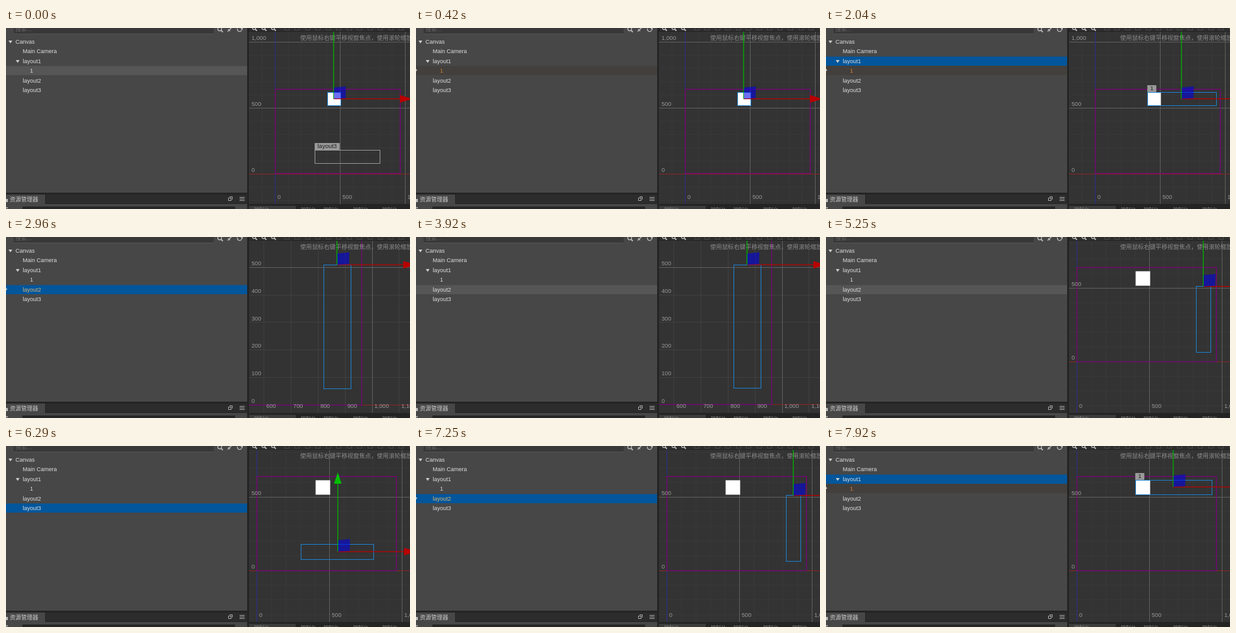
Animation, 640 px wide and 288 px high, one loop 8 s. Source, as an HTML page with a canvas:

```html
<!DOCTYPE html>
<html lang="zh">
<head>
<meta charset="utf-8">
<style>
html, body { margin: 0; width: 100%; height: 100%; overflow: hidden; background: #262626; }
canvas { display: block; }
</style>
</head>
<body>
<canvas id="stage" width="640" height="288"></canvas>
<script>
const c = document.getElementById('stage').getContext('2d');
const LOOP = 8000;
const SANS = '"Liberation Sans", "Noto Sans CJK SC", "Noto Sans CJK", sans-serif';

// Nodes in world units: left, bottom, right, top, pivot
const nodes = {
  layout1: { box: [400, 515, 927, 615], pivot: [663, 568] },
  1: { box: [400, 515, 500, 615], pivot: [449, 568] },
  layout2: { box: [820, 60, 920, 510], pivot: [870, 510] },
  layout3: { box: [304, 77, 806, 178], pivot: [557, 128] }
};
const rows = [
  ['Canvas', 15, 22, true], ['Main Camera', 26.5, 37.5], ['layout1', 26.5, 53, true],
  ['1', 38, 68], ['layout2', 26.5, 84], ['layout3', 26.5, 99]
];

// time, selected node, tree focused, hovered node, pointer in tree
const states = [
  [0, '1', false, 'layout3', false],
  [120, '1', false, null, false],
  [240, '1', false, '1', true],
  [960, '1', false, 'layout1', true],
  [1140, 'layout1', true, 'layout1', true],
  [1340, 'layout1', true, '1', true],
  [2080, 'layout1', true, 'layout2', true],
  [2710, 'layout2', true, 'layout2', true],
  [3580, 'layout2', true, null, false],
  [3920, 'layout2', false, null, false],
  [5290, 'layout2', false, 'layout3', true],
  [5650, 'layout3', true, 'layout3', true],
  [5920, 'layout3', true, null, false],
  [6330, 'layout3', true, 'layout2', true],
  [6620, 'layout2', true, 'layout2', true],
  [7290, 'layout2', true, 'layout1', true],
  [7620, 'layout1', true, 'layout1', true],
  [7870, 'layout1', true, '1', true]
];

// time, origin x, origin y, scale x, scale y
const views = [
  [0, 426.5, 232, .206, .21],
  [2830, 426.5, 232, .206, .21],
  [2831, 152, 267, .428, .437],
  [3920, 152, 267, .428, .437],
  [4290, 300, 216, .282, .286],
  [4330, 300, 216, .282, .286],
  [4500, 355, 216, .282, .286],
  [4710, 355, 216, .282, .286],
  [4790, 397.5, 198, .23, .234],
  [LOOP, 397.5, 198, .23, .234]
];

function viewAt(t) {
  const i = views.findIndex(v => v[0] > t), a = views[i - 1], b = views[i];
  const k = (t - a[0]) / (b[0] - a[0]);
  return a.slice(1).map((n, j) => n + (b[j + 1] - n) * k);
}
function fill(color, x, y, w, h) {
  c.fillStyle = color;
  c.fillRect(x, y, w, h);
}
function line(color, width, ...pts) {
  c.strokeStyle = color;
  c.lineWidth = width;
  c.beginPath();
  for (let i = 0; i < pts.length; i += 2) c.lineTo(pts[i], pts[i + 1]);
  c.stroke();
}
function poly(color, ...pts) {
  c.fillStyle = color;
  c.beginPath();
  for (let i = 0; i < pts.length; i += 2) c.lineTo(pts[i], pts[i + 1]);
  c.fill();
}
function text(s, x, y, color, size = 9) {
  c.font = `${size}px ${SANS}`;
  c.textBaseline = 'alphabetic';
  c.fillStyle = color;
  c.fillText(s, x, Math.floor(y + size * .36));
}
function lens(x, y, r) {
  c.strokeStyle = '#bbb';
  c.lineWidth = 1.3;
  c.beginPath();
  c.arc(x, y, r, 0, 7);
  c.stroke();
  line('#bbb', 1.8, x + r * .7, y + r * .7, x + r + 2, y + r + 2);
}
const snap = n => Math.floor(n) + .5;

function drawTree(sel, focus, hover, inTree) {
  fill('#474747', 0, 0, 382, 263);
  fill('#383838', 12, 0, 317, 9);
  text('搜索...', 15, 2, '#666');
  line('#555', 1, 12, 9.5, 329, 9.5);
  lens(338.5, 1.5, 3);
  line('#bbb', 1.5, 351, 5.5, 357, 0);
  line('#bbb', 1.2, 352, 2, 355, 5);
  c.strokeStyle = '#bbb';
  c.lineWidth = 1.3;
  c.beginPath();
  c.arc(370, 2, 3.5, -.3, 3.5);
  c.stroke();
  poly('#bbb', 371, 0, 375, 0, 375, 3);

  for (const [name, x, y, open] of rows) {
    const over = inTree && hover === name, on = sel === name;
    const back = on && focus ? '#03569c' : over ? '#423f3c' : on ? '#565656' : null;
    if (back) fill(back, 0, y - 7.5, 382, 14.5);
    if (open) poly('#ccc', x - 11, y - 2, x - 5, y - 2, x - 8, y + 2.5);
    if (over) poly('#ccc', 0, y - 3, 2, y - 1, 0, y + 1);
    text(name, x, y, over ? (on && focus ? '#d9b36c' : '#e0802c') : '#ddd');
  }
}

function drawAssets() {
  fill('#242424', 0, 262, 384, 26);
  fill('#474747', 0, 265, 62, 16);
  fill('#2c2c2c', 63, 265, 319, 14);
  fill('#474747', 0, 280, 382, 8);
  fill('#262626', 26, 284, 337, 4);
  fill('#bbb', 0, 272, 3, 5);
  text('资源管理器', 6, 273, '#ccc');
  c.strokeStyle = '#aaa';
  c.lineWidth = 1;
  c.strokeRect(352.5, 270.5, 4, 4);
  line('#aaa', 1, 354, 268.5, 358.5, 268.5, 358.5, 273);
  for (const y of [269.5, 272, 274.5]) line('#aaa', 1, 370, y, 378, y);
  poly('#bbb', 0, 285, 3, 285, 1.5, 288);
}

function drawGizmo(x, y) {
  line('#c00000', 1.3, x, y, x + 107, y);
  line('#00b400', 1.3, x, y, x, y - 108);
  poly('#b80000', x + 105, y - 6, x + 125, y, x + 105, y + 6);
  poly('#00c000', x - 6, y - 108, x, y - 126, x + 6, y - 108);
  poly('rgba(0,0,230,.57)', x + .5, y - 18, x + 19.5, y - 20, x + 19, y - 1, x + .5, y);
}

function drawScene(view, sel, hover) {
  const [ox, oy, sx, sy] = view;
  const X = n => ox + n * sx, Y = n => oy - n * sy;
  const rect = ([l, b, r, t]) => [Math.round(X(l)) + .5, snap(Y(t)), Math.round((r - l) * sx), Math.round((t - b) * sy)];
  c.save();
  c.beginPath();
  c.rect(385, 6, 255, 274);
  c.clip();
  fill('#333', 385, 6, 255, 274);

  const grid = major => {
    const color = major ? '#606060' : sx > .4 ? '#404040' : '#383838';
    for (let n = -1000; n <= 2000; n += 100) {
      if ((n % 500 === 0) !== major) continue;
      const x = snap(X(n)), y = snap(Y(n));
      line(color, 1, x, 6, x, 280);
      line(color, 1, 385, y, 640, y);
    }
  };
  grid(false);
  grid(true);
  line('#902424', 1, 385, snap(oy), 640, snap(oy));
  line('#2c2c90', 1, snap(ox), 6, snap(ox), 280);
  c.strokeStyle = '#800080';
  c.lineWidth = 1.2;
  c.strokeRect(snap(ox), snap(Y(640)), Math.round(960 * sx), Math.round(640 * sy));

  const step = sx > .4 ? 100 : 500;
  for (let n = 0; n <= 1500; n += step) {
    const label = n.toLocaleString('en-US');
    if (X(n) > 384) text(label, X(n) + 3.5, 269, '#999', 9.2);
    text(label, 389, Y(n) - 6, '#999', 9.2);
  }
  text('使用鼠标右键平移视窗焦点，使用滚轮缩放视图', 466, 16, '#8c8c8c', 9.35);

  fill('#fff', ...rect(nodes[1].box));
  c.lineWidth = 1;
  if (hover && hover !== sel) {
    const r = rect(nodes[hover].box);
    c.strokeStyle = '#999';
    c.strokeRect(...r);
    c.font = `9.5px ${SANS}`;
    fill('#999', r[0] - .5, r[1] - 11.5, c.measureText(hover).width + 9, 11);
    text(hover, r[0] + 4, r[1] - 6, '#222', 9.5);
  }
  c.strokeStyle = '#1b84d6';
  c.strokeRect(...rect(nodes[sel].box));
  const [px, py] = nodes[sel].pivot;
  drawGizmo(X(px), Y(py));
  c.restore();
}

function drawFrame() {
  fill('#242424', 382, 0, 258, 288);
  fill('#2e2e2e', 386, 0, 254, 5);
  for (const x of [393, 408, 423]) lens(x, 0, 2.5);
  c.strokeStyle = '#484848';
  c.lineWidth = 1;
  for (let x = 441; x < 640; x += 16.5) c.strokeRect(snap(x), -3.5, 7, 7);
  fill('#3c3c3c', 385, 283, 74, 5);
  for (const x of [393, 467, 503, 550, 596]) text('控制台', x, 290, '#888', 8);
}

function draw(now) {
  const t = now % LOOP;
  const [, sel, focus, hover, inTree] = states.filter(s => s[0] <= t).pop();
  drawFrame();
  drawTree(sel, focus, hover, inTree);
  drawAssets();
  drawScene(viewAt(t), sel, hover);
  requestAnimationFrame(() => draw(performance.now() - start));
}
const start = performance.now();
draw(0);
</script>
</body>
</html>
```
